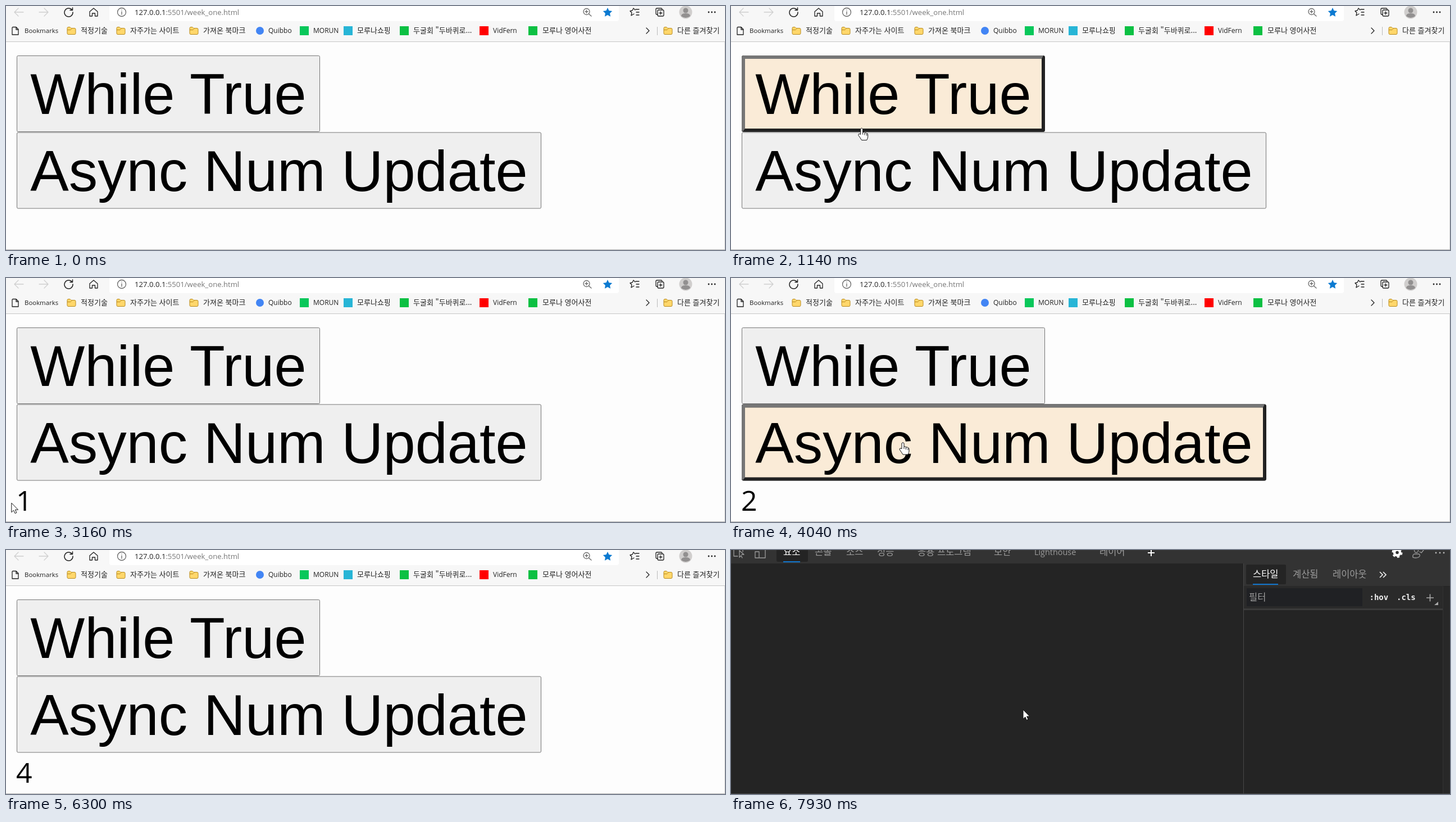
An HTML page for the animation above (8 s loop, 1280 px wide and 434 px high).

```html
<!DOCTYPE html>
<html lang="ko">
<head>
<meta charset="utf-8">
<title>Async counter</title>
<style>
html, body { margin: 0; width: 100%; height: 100%; overflow: hidden; background: #fdfdfd; }
svg { display: block; width: 100vw; height: 100vh; }
text { white-space: pre; }
.ko { font: 13px "Noto Sans CJK KR", "Noto Sans CJK", sans-serif; fill: #222; }
.en { font: 12px "Open Sans", "Noto Sans", sans-serif; fill: #222; }
.url { font: 13.1px "Open Sans", "Noto Sans", sans-serif; fill: #777; }
.big { font: 102.8px "Liberation Sans", Arial, sans-serif; text-anchor: middle; }
.num { font: 50px "Open Sans", "Noto Sans", sans-serif; }
.tab { font: 16.5px "Noto Sans CJK KR", "Noto Sans CJK", sans-serif; fill: #9c9c9c; }
.mono { font: bold 14px "DejaVu Sans Mono", monospace; fill: #eee; }
.line { fill: none; stroke: #222; stroke-width: 1.3; stroke-linecap: round; stroke-linejoin: round; }
</style>
</head>
<body>
<svg id="stage" viewBox="0 0 1280 434" preserveAspectRatio="none">
  <defs>
    <g id="folder">
      <path d="M1 3Q1 1 3 1H6L8 3H14Q16 3 16 5V12Q16 14 14 14H3Q1 14 1 12Z" fill="#ffd76b" stroke="#b98a1c"/>
      <path d="M1 6H7L9 4" fill="none" stroke="#b98a1c"/>
    </g>
    <path id="star" d="M0-8L2.5-2.8 8.2-2 4.1 2 5.1 7.8 0 5.1-5.1 7.8-4.1 2-8.2-2-2.5-2.8Z"/>
  </defs>

  <g id="page">
    <rect width="1280" height="434" fill="#fdfdfd"/>
    <rect width="1280" height="63" fill="#f7f7f7"/>
    <rect y="63" width="1280" height="1" fill="#c6c6c6"/>
    <rect x="184" y="-10" width="907" height="37" rx="4" fill="#fff"/>
    <g class="line">
      <path d="M31 11H15M22 4L15 11 22 18M59 11H75M68 4L75 11 68 18" stroke="#cfcfcf"/>
      <path d="M117.500 7A7.500 7.500 0 1 0 119 11M118.500 3V7.500H114" stroke-width="1.500"/>
      <path d="M149 10L156 4 163 10V18H158.500V13H153.500V18H149Z"/>
      <g stroke="#666">
        <circle cx="206" cy="11" r="7.500"/><path d="M206 10V15M206 7V7.200"/>
        <circle cx="1033.500" cy="10" r="5.500"/><path d="M1037.500 14L1042 18M1031 10H1036M1033.500 7.500V12.500"/>
      </g>
      <path d="M1121 6H1127M1122 11H1127M1122 16H1127M1120 7L1117 4 1115 8 1111 9 1114 12 1113 17 1118 14"/>
      <path d="M1160 15H1158Q1157 15 1157 13V6Q1157 4 1159 4H1166Q1168 4 1168 6"/>
      <rect x="1160" y="7" width="11" height="11" rx="2"/><path d="M1165.500 10V15M1163 12.500H1168"/>
      <path d="M1140 39L1145 44 1140 49"/>
      <path d="M12 37.500H18L22 41.500V51H11V38.500ZM18 38V42H22"/>
    </g>
    <use href="#star" x="1071" y="11" fill="#0b7ad1"/>
    <circle cx="1210" cy="11" r="11.500" fill="#d0cecd"/>
    <circle cx="1210" cy="8" r="4.500" fill="#929090"/>
    <path d="M1202 18Q1202 13 1210 13T1218 18Q1210 24 1202 18Z" fill="#929090"/>
    <g fill="#222"><circle cx="1251" cy="11" r="1.400"/><circle cx="1256.500" cy="11" r="1.400"/><circle cx="1262" cy="11" r="1.400"/></g>
    <text class="url" x="229" y="16"><tspan fill="#222">127.0.0.1</tspan>:5501/week_one.html</text>
    <rect x="1159" y="37" width="1" height="15" fill="#bbb"/>
    <g id="marks"></g>
    <g id="buttons"></g>
    <text id="count" class="num" x="18" y="414"></text>
    <g id="menu">
      <rect x="750" y="136" width="378" height="310" rx="4" fill="#e2e2e2"/>
      <rect x="751" y="137" width="376" height="310" rx="4" fill="#fbfbfb"/>
      <path d="M751 254.500H1127M751 362.500H1127" stroke="#e4e4e4"/>
    </g>
    <rect x="1279" y="64" width="1" height="370" fill="#d8d8d8"/>
  </g>

  <rect id="blank" width="1280" height="434" fill="#fdfdfd"/>

  <g id="tools">
    <rect width="1280" height="434" fill="#242424"/>
    <rect width="1280" height="24" fill="#333"/>
    <rect x="81" y="-4" width="56" height="25" rx="3" fill="#242424"/>
    <rect x="93" y="20" width="30" height="2" fill="#1277cf"/>
    <g class="line" style="stroke:#9c9c9c">
      <path d="M5-3V11H12M21-3V3M15 1V13L18 10 20 14M15 1L23 8H19"/>
      <path d="M46-2H61V14H51M43 3H50V14H43Z"/>
      <circle cx="1220" cy="1" r="3.500"/><path d="M1214 13Q1213 7 1218 7H1223Q1227 7 1226 11Q1224 14 1219 14T1214 12M1226 3L1229 5 1233 0"/>
    </g>
    <path d="M742 5H754M748-1V11" stroke="#fff" stroke-width="2"/>
    <circle cx="1186" cy="4.500" r="5" fill="none" stroke="#fff" stroke-width="4.500"/>
    <circle cx="1186" cy="4.500" r="8" fill="none" stroke="#fff" stroke-width="3" stroke-dasharray="4.200 4.178"/>
    <g fill="#b5b5b5"><circle cx="1255" cy="5" r="1.400"/><circle cx="1262" cy="5" r="1.400"/><circle cx="1269" cy="5" r="1.400"/></g>
    <g id="tabs"></g>
    <g id="side">
      <rect x="912" y="24" width="368" height="40" fill="#333"/>
      <rect x="912" y="64" width="356" height="41" fill="#2a2a2a"/>
      <rect x="917" y="26" width="71" height="35" rx="2" fill="#242424"/>
      <rect x="929" y="60" width="45" height="2" fill="#1277cf"/>
      <rect x="918" y="68" width="206" height="32" fill="#202124"/>
      <rect x="913" y="104" width="355" height="3" fill="#3b3b3b"/>
      <rect x="1268" y="65" width="12" height="369" fill="#282828"/>
      <rect x="1267" y="65" width="1" height="369" fill="#333"/>
      <rect x="912" y="24" width="1" height="410" fill="#484848"/>
      <path d="M1155 39L1160 44 1155 49M1161 39L1166 44 1161 49" fill="none" stroke="#eee" stroke-width="1.700"/>
      <path d="M1238 85H1251M1244.500 78.500V91.500" stroke="#aaa" stroke-width="1.600"/>
      <path d="M1259 92V98H1252Z" fill="#aaa"/>
      <text class="mono" x="1136.500" y="89">:hov</text>
      <text class="mono" x="1185" y="89">.cls</text>
    </g>
  </g>
  <rect y="433" width="1280" height="1" id="edge"/>
  <g id="cursor" stroke="#111" stroke-linejoin="round" fill="#fff">
    <path id="hand" d="M-2 2Q0-1 2 2V8Q5 7 5.500 9 8.500 8 9 10 11 10 11 12V16Q11 18 9 22H0Q-3 17-6 13-6 10-3 11L-2 12ZM2 8V12M5.500 9V13M9 10.500V14"/>
    <path id="arrow" d="M0 0V16.500L3.800 13 6.300 18.500 9 17.300 6.600 12H11.700Z"/>
  </g>
</svg>
<script>
const $ = id => document.getElementById(id);
const show = (node, on) => node.style.display = on ? '' : 'none';
const LOOP = 8000;

const text = (cls, x, y, s, style = '') => `<text class="${cls}" x="${x}" y="${y}" style="${style}">${s}</text>`;
const dot = (x, color) => `<circle cx="${x}" cy="44" r="7" fill="${color}"/>`;
const square = (x, color) => `<rect x="${x - 8}" y="36" width="16" height="16" fill="${color}"/>`;
const folder = x => `<use href="#folder" x="${x - 8.5}" y="36.5"/>`;

$('marks').innerHTML =
  text('en', 33, 48, 'Bookmarks', 'font-size:11.4px') +
  [[133, '적정기술'], [221, '자주가는 사이트'], [351, '가져온 북마크'], [1195, '다른 즐겨찾기']]
    .map(([x, s]) => folder(x - 16.5) + text('ko', x, 48, s)).join('') +
  dot(452, '#4285f4') + text('en', 467, 48, 'Quibbo') +
  square(531, '#08c75a') + text('en', 547, 48, 'MORUN') +
  square(609, '#27b5d6') + text('ko', 625, 48, '모루나쇼핑') +
  square(709, '#0cc043') + text('ko', 725, 48, '두굴회 "두바퀴로...') +
  square(851, '#f00') + text('en', 867, 48, 'VidFern') +
  square(938, '#0cc043') + text('ko', 955, 48, '모루나 영어사전');

const tabs = [[93, '요소'], [149, '콘솔'], [205, '소스'], [260, '성능'], [332, '응용 프로그램'], [468, '보안'], [656, '레이어']];
$('tabs').innerHTML = tabs.map(([x, s], i) => text('tab', x, 9, s, i ? '' : 'fill:#fff')).join('') +
  text('en', 540, 9, 'Lighthouse', 'font-size:14.4px;fill:#9c9c9c');
$('side').innerHTML += text('tab', 929, 49, '스타일', 'fill:#fff') + text('tab', 1000, 49, '계산됨') +
  text('tab', 1071, 49, '레이아웃') + text('tab', 922, 90, '필터');

function makeButton(label, y, w) {
  const g = document.createElementNS('http://www.w3.org/2000/svg', 'g');
  const x = 19, h = 136, r = x + w, b = y + h;
  g.innerHTML = `
    <rect x="${x + .5}" y="${y + .5}" width="${w - 1}" height="${h - 1}" rx="2" fill="#efefef" stroke="#767676"/>
    <g>
      <rect x="${x}" y="${y}" width="${w}" height="${h}" rx="4"/>
      <path d="M${x} ${b - 3}V${y + 4}Q${x} ${y} ${x + 4} ${y}H${r - 3}L${r - 6} ${y + 6}H${x + 6}V${b - 6}L${x + 2} ${b - 1}Z"/>
      <rect x="${x + 6}" y="${y + 6}" width="${w - 12}" height="${h - 12}" fill="#faebd7"/>
    </g>` + text('big', x + w / 2, y + 104, label);
  $('buttons').append(g);
  const [low, high] = g.children[1].children;
  return {
    hit: (px, py) => px >= x && px < r && py >= y && py < b,
    set(hover, pressed) {
      show(g.children[1], hover);
      low.setAttribute('fill', pressed ? '#767676' : '#222');
      high.setAttribute('fill', pressed ? '#222' : '#767676');
    }
  };
}
const buttons = [makeButton('While True', 88, 540), makeButton('Async Num Update', 224.5, 934)];

// Pointer stops: time, x, y
const path = [
  [260, 945, 432], [430, 560, 230], [560, 330, 67], [700, 231, 155], [815, 229, 222], [880, 229, 222],
  [1020, 232, 272], [1070, 232, 272], [1190, 233, 185], [1250, 233, 180], [1390, 236, 269],
  [1860, 236, 269], [1940, 231, 283], [2130, 231, 283], [2270, 233, 304], [2410, 233, 304],
  [2880, 90, 385], [2960, 88, 380], [3130, 5, 400], [3300, 60, 402], [3700, 60, 402],
  [4030, 306, 292], [4110, 306, 292], [4250, 420, 180], [4450, 500, 280], [4520, 500, 280],
  [4680, 610, 146], [4860, 640, 285], [5000, 640, 285], [5280, 800, 290], [5350, 800, 290],
  [5560, 750, 139], [5620, 750, 139], [5760, 800, 446],
  [7500, 500, 446], [7860, 520, 284], [8000, 520, 284]
];

function pointer(t) {
  if (t < 260 || t > 5760 && t < 7500) return null;
  const i = path.findIndex(p => p[0] > t);
  const [t0, x0, y0] = path[i - 1], [t1, x1, y1] = path[i];
  const k = (t - t0) / (t1 - t0), e = k * k * (3 - 2 * k);
  return [x0 + (x1 - x0) * e, y0 + (y1 - y0) * e];
}

function draw(t) {
  const p = pointer(t), dark = t >= 7380, menu = t >= 5600 && t < 6300;
  const hot = p && !dark && !menu ? buttons.findIndex(b => b.hit(p[0], p[1] + 3)) : -1;
  buttons.forEach((b, i) => b.set(i === hot, t >= 1610 && t < 1660));
  const n = Math.floor((t - 1660) / 1020);
  $('count').textContent = n > 0 ? Math.min(n, 4) : '';
  show($('menu'), menu);
  $('blank').setAttribute('opacity', Math.min(1, Math.max(0, (t - 6560) / 240)));
  show($('tools'), dark);
  show($('tabs'), t >= 7450);
  show($('side'), t >= 7600);
  $('edge').setAttribute('fill', dark ? '#454545' : '#b0b0b0');
  show($('cursor'), p);
  if (p) $('cursor').setAttribute('transform', `translate(${p[0]} ${p[1]})`);
  show($('hand'), hot >= 0);
  show($('arrow'), hot < 0);
}

const start = performance.now();
(function tick() {
  draw((performance.now() - start) % LOOP);
  requestAnimationFrame(tick);
})();
</script>
</body>
</html>
```
